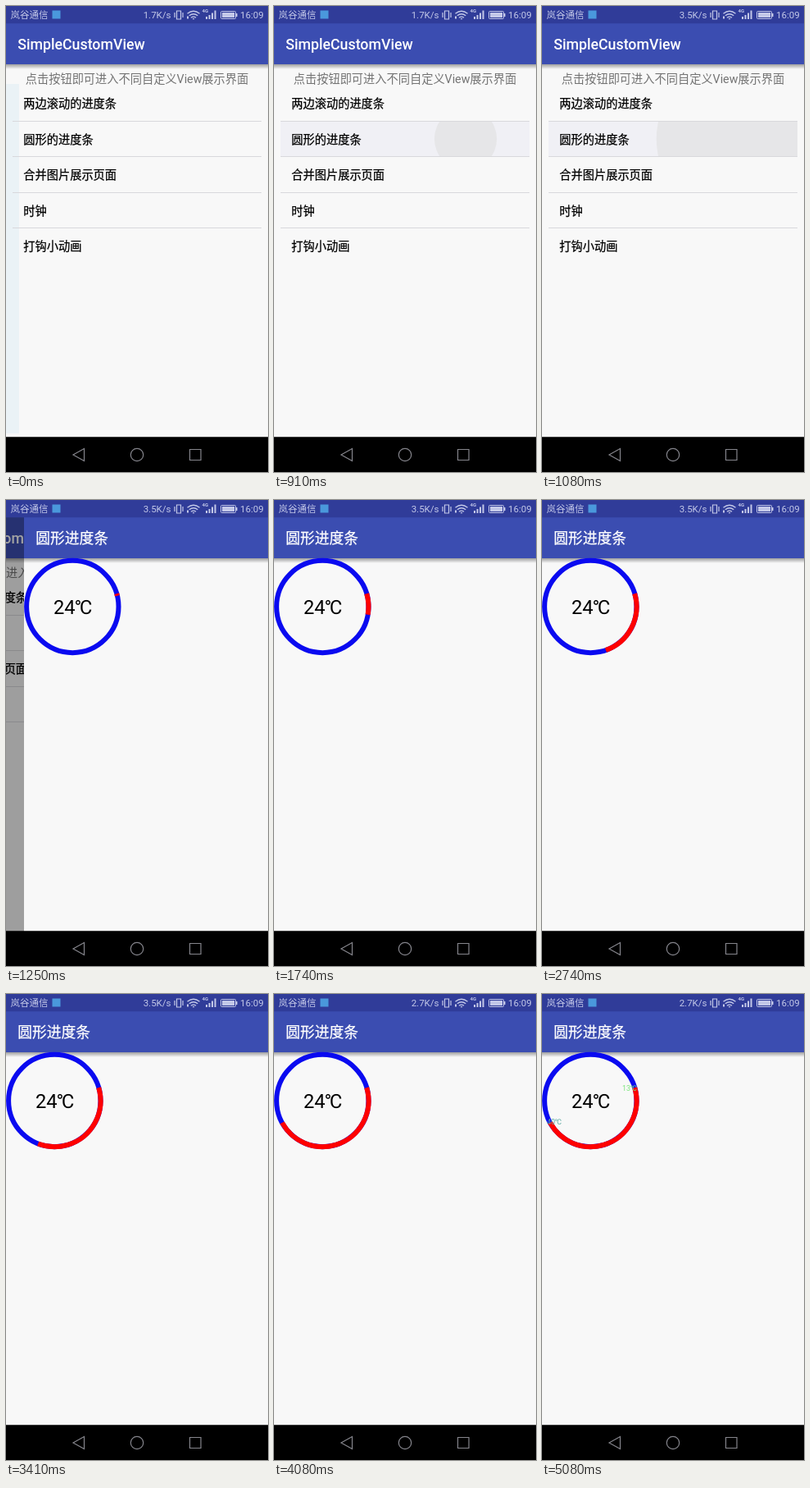
Animation of 320 by 568 pixels, one loop 5160 ms. Source, as an HTML page:

```html
<!DOCTYPE html>
<html lang="zh-CN">
<head>
<meta charset="utf-8">
<style>
html, body { margin: 0; width: 100%; height: 100%; overflow: hidden; background: #000; }
svg { display: block; width: 320px; height: 568px; }
text { font: 14.22px Roboto, "Noto Sans CJK SC", "Noto Sans CJK", sans-serif; white-space: pre; }
.title { font-size: 17.78px; font-weight: 500; fill: #fff; }
.heavy { stroke: #fff; stroke-width: .25; }
#rows text { stroke: #000; stroke-width: .25; }
.status text { font-size: 11.5px; fill: #c3c8e8; }
.status .tiny { font-size: 6px; font-weight: 700; }
.temp { font-size: 23.7px; text-anchor: middle; }
.mark { font-size: 8.9px; }
.line { fill: none; stroke: #c3c8e8; }
</style>
</head>
<body>
<svg viewBox="0 0 320 568">
  <defs>
    <linearGradient id="shade" x2="0" y2="1">
      <stop stop-opacity=".36"/><stop offset="1" stop-opacity="0"/>
    </linearGradient>
    <clipPath id="row"><path d="M8 140.5h304v43H8z"/></clipPath>
    <g id="frame">
      <path fill="#f8f8f8" d="M0 21h320v505H0z"/>
      <path fill="url(#shade)" d="M0 71h320v6H0z"/>
      <path fill="#3b4db1" d="M0 21h320v50.110H0z"/>
    </g>
  </defs>

  <g id="list">
    <use href="#frame"/>
    <path id="strip" fill="#eaf2f6" d="M0 95h16v426H0z"/>
    <g id="press" clip-path="url(#row)">
      <path fill="#f0f0f5" d="M8 140h304v44H8z"/>
      <circle id="ripple" cx="234" cy="162" fill="#e6e6e8"/>
    </g>
    <text class="title" x="14.2" y="52.5">SimpleCustomView</text>
    <text x="160" y="93.5" text-anchor="middle" fill="#737373">点击按钮即可进入不同自定义View展示界面</text>
    <g id="rows"></g>
    <path id="dim" d="M0 21h320v505H0z"/>
  </g>

  <g id="detail">
    <use href="#frame"/>
    <text class="title heavy" x="14.2" y="53">圆形进度条</text>
    <g fill="none" stroke-width="6">
      <circle cx="59.3" cy="130" r="56.2" stroke="#0a0af0"/>
      <circle id="arc" cx="59.3" cy="130" r="56.2" stroke="#f00" pathLength="360" transform="rotate(-16.5 59.3 130)"/>
    </g>
    <text class="temp" x="59.6" y="139">24℃</text>
    <g id="marks">
      <text class="mark" x="98" y="118" fill="#78e478">13℃</text>
      <text class="mark" x="6" y="159" fill="#58a8a0">40℃</text>
    </g>
  </g>

  <g class="status">
    <path fill="#303c99" d="M0 0h320v21.330H0z"/>
    <text x="5.5" y="15.3">岚谷通信</text>
    <path fill="#4a98dc" d="M56.5 5.5h10v10h-10z"/>
    <text id="speed" x="201.5" y="15" text-anchor="end"></text>
    <path class="line" stroke-width="1.2" d="M208.5 6h5v10h-5zM206 8v6M216 8v6"/>
    <path class="line" stroke-width="1.4" d="M221.5 9.2q7.5-6 15 0M223.8 11.8q5.2-4 10.4 0M226 14.2q3-2.2 6 0"/>
    <path fill="#c3c8e8" d="M227.5 15h3l-1.5 1.7zM221 12.5h2v3h-2z"/>
    <text class="tiny" x="239.5" y="8">4G</text>
    <path class="line" stroke-width="2" d="M245 13v3M248.5 11v5M252 8.5v7.5M255.5 5.5v10.5"/>
    <rect class="line" x="262.5" y="6.5" width="18" height="9" rx="1"/>
    <path fill="#c3c8e8" d="M264 8h15v6h-15zM281 9h1.5v4H281z"/>
    <text x="286" y="15">16:09</text>
  </g>
  <path d="M0 525.33h320V568H0z"/>
  <g fill="none" stroke="#85858c" stroke-width="1.2">
    <path d="M82 547l13.5-7.5v15zM224.5 540.5h13.5v13h-13.5z"/>
    <circle cx="160" cy="547" r="7.7"/>
  </g>
</svg>
<script>
const LOOP = 5160, STEP = LOOP / 62;
const $ = id => document.getElementById(id);
const set = (id, name, value) => $(id).setAttribute(name, value);
const show = (id, on) => set(id, 'visibility', on ? 'visible' : 'hidden');
const clamp = x => Math.min(1, Math.max(0, x));

$('rows').innerHTML = ['两边滚动的进度条', '圆形的进度条', '合并图片展示页面', '时钟', '打钩小动画']
  .map((label, i) => {
    const y = 124.2 + i * 43.5;
    const divider = i < 4 ? `<path stroke="#d8d8dc" d="M8 ${Math.round(y + 15.5) + .5}h304"/>` : '';
    return `<text x="21.3" y="${y}">${label}</text>${divider}`;
  }).join('');

// Degrees of red arc: slow while the page slides in, then steady.
function sweep(t) {
  if (t < 1250) return 3 * clamp((t - 1160) / 90);
  if (t < 1740) return 3 + 23 * (t - 1250) / 490;
  return 26 + 142 * clamp((t - 1740) / 2340);
}

function draw(t) {
  const offset = Math.round(320 * (1 - clamp((t - 1078) / 350)) ** 4);
  const sliding = t >= 1120;
  const entered = sliding ? 1 - offset / 320 : 0;

  show('strip', t < 75);
  show('press', t >= 740 && !sliding);
  set('ripple', 'r', 38 * Math.max(0, (t - 750) / 165) ** 1.3);
  set('list', 'transform', `translate(${-117 * entered})`);
  set('dim', 'opacity', .39 * entered);

  set('detail', 'transform', `translate(${sliding ? offset : 320})`);
  set('arc', 'stroke-dasharray', `${sweep(t)} 360`);
  show('marks', t >= 4990);
  $('speed').textContent = t < 1075 ? '1.7K/s' : t < 4070 ? '3.5K/s' : '2.7K/s';
}

function tick() {
  const t = performance.now() % LOOP;
  draw(Math.floor((t + 8) / STEP) % 62 * STEP);
  requestAnimationFrame(tick);
}
tick();
</script>
</body>
</html>
```
